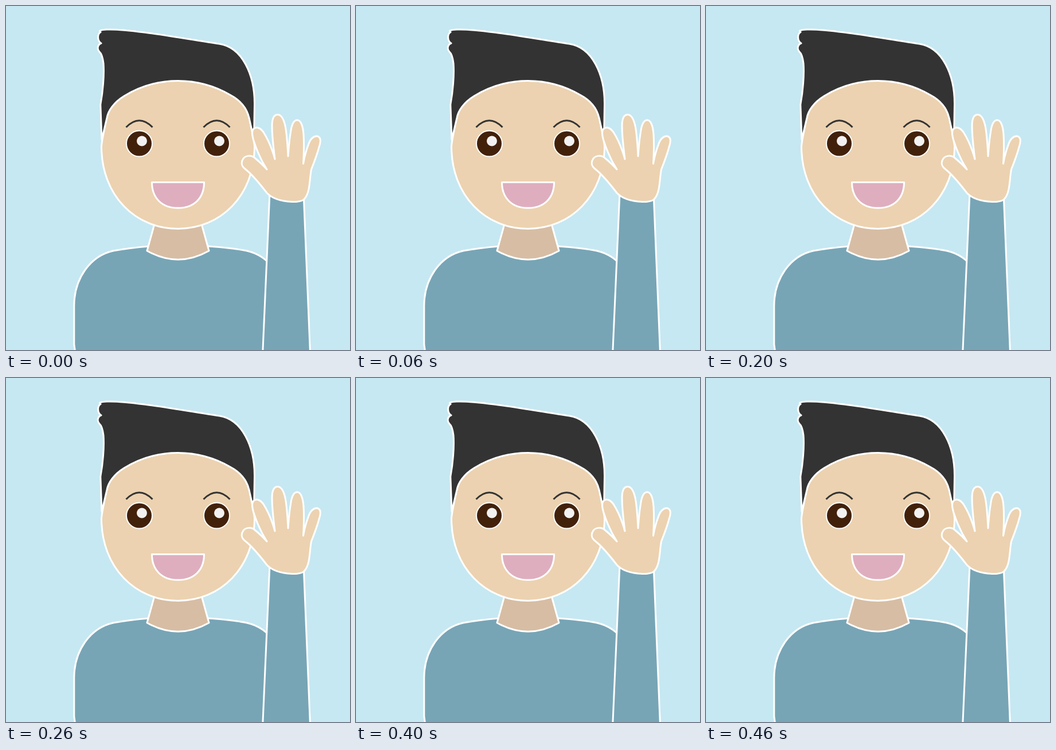
An HTML page that plays this animation: 600x600 px, repeating every 0.5 s.

```html
<!DOCTYPE html>
<html lang="en">
<head>
<meta charset="utf-8">
<title>Waving</title>
<style>
  html, body { margin: 0; width: 100%; height: 100%; overflow: hidden; background: #c6e8f2; }
  svg { display: block; width: 600px; height: 600px; }
  .skin { fill: #ecd2b0; }
  .shirt { fill: #77a5b6; }
  .brow { fill: none; stroke: #333; }
</style>
</head>
<body>
<svg viewBox="0 0 600 600" stroke="#fff" stroke-width="3" stroke-linejoin="round">
  <defs>
    <g id="eye">
      <path class="brow" d="M209.5 211.5Q232.5 188 255.5 211.5"/>
      <circle cx="232.5" cy="240" r="22.5" fill="#42210b" stroke-width="2"/>
      <circle cx="237" cy="235.5" r="9" fill="#f2f2f2" stroke="none"/>
    </g>
  </defs>

  <path class="shirt" d="M121 606L118.800 590V523C119 475 147 436 187 427Q215 422 250 419H352Q395 422 420 427C460 436 488 475 488 523V606Z"/>
  <path fill="#d7bda3" d="M259 380L246 427Q300 457.500 354 427L341 380Z"/>
  <path class="skin" d="M166.500 245Q167 235 176 195C178 183 188 168 206 157C232 141 265 130.500 300 130.500C333 130.500 365 140 391 155C410 165 420 178 424 195Q433 235 433.500 245C433.500 331 374 388.500 300 388.500C226 388.500 166.500 331 166.500 245Z"/>
  <path fill="#333" d="M165 45.500Q159 42 176 41C215 39.500 300 55 372 66C412 72 434 120 433.500 172L432.500 233L424 195C420 178 410 165 391 155C365 140 333 130.500 300 130.500C265 130.500 232 141 206 157C188 168 178 183 176 195L167 233L164.800 172C169 150 171.500 120 170 100Q168 84 163 80C158 75 160 67 166 65C159 61 159 49 165 45.500Z"/>
  <use href="#eye"/>
  <use href="#eye" x="135"/>
  <path fill="#deaebf" d="M254.500 307.500H345.500C345.500 335 328 352.300 300 352.300C272 352.300 254.500 335 254.500 307.500Z"/>

  <g id="arm">
    <path class="shirt" d="M460 325H519L534 690H444Z"/>
    <path class="skin" d="M455 326Q468 340 499 341.500Q515 342 520 337C531 325 529 303 532.500 285C538 271 543 258 546 246C549 237 550 229 543 227C536 226 530 233 527 243C523 254 520 265 518.500 275C519.500 258 520 240 519 224C518 209 514 199 508 199C501 199 498 208 496.500 220C494 234 493 248 492 262C491 242 490 224 487 209C484 196 480 189.500 474 189.500C467 189.500 464 197 464 209C464 230 467 250 469 267C464 249 456 231 449 220C443 212 437 210 432 214C428 218 429 225 432 235C438 254 446 271 455 285C447 276 440 270 434 265C428 260 419 260 414 266C409 273 411 280 418 285C432 296 444 312 455 326Z"/>
  </g>
</svg>
<script>
  const STEP = 100;
  const rest = [0, 0, 0];
  const outward = [57, 2, 6.8];
  const inward = [-49, -0.5, -7.4];
  const wave = [rest, outward, rest, inward, rest];
  const arm = document.getElementById("arm");

  function draw() {
    const [dx, dy, angle] = wave[Math.floor(performance.now() / STEP) % wave.length];
    arm.setAttribute("transform", `translate(${dx} ${dy}) rotate(${angle} 492 262)`);
    requestAnimationFrame(draw);
  }
  draw();
</script>
</body>
</html>
```
